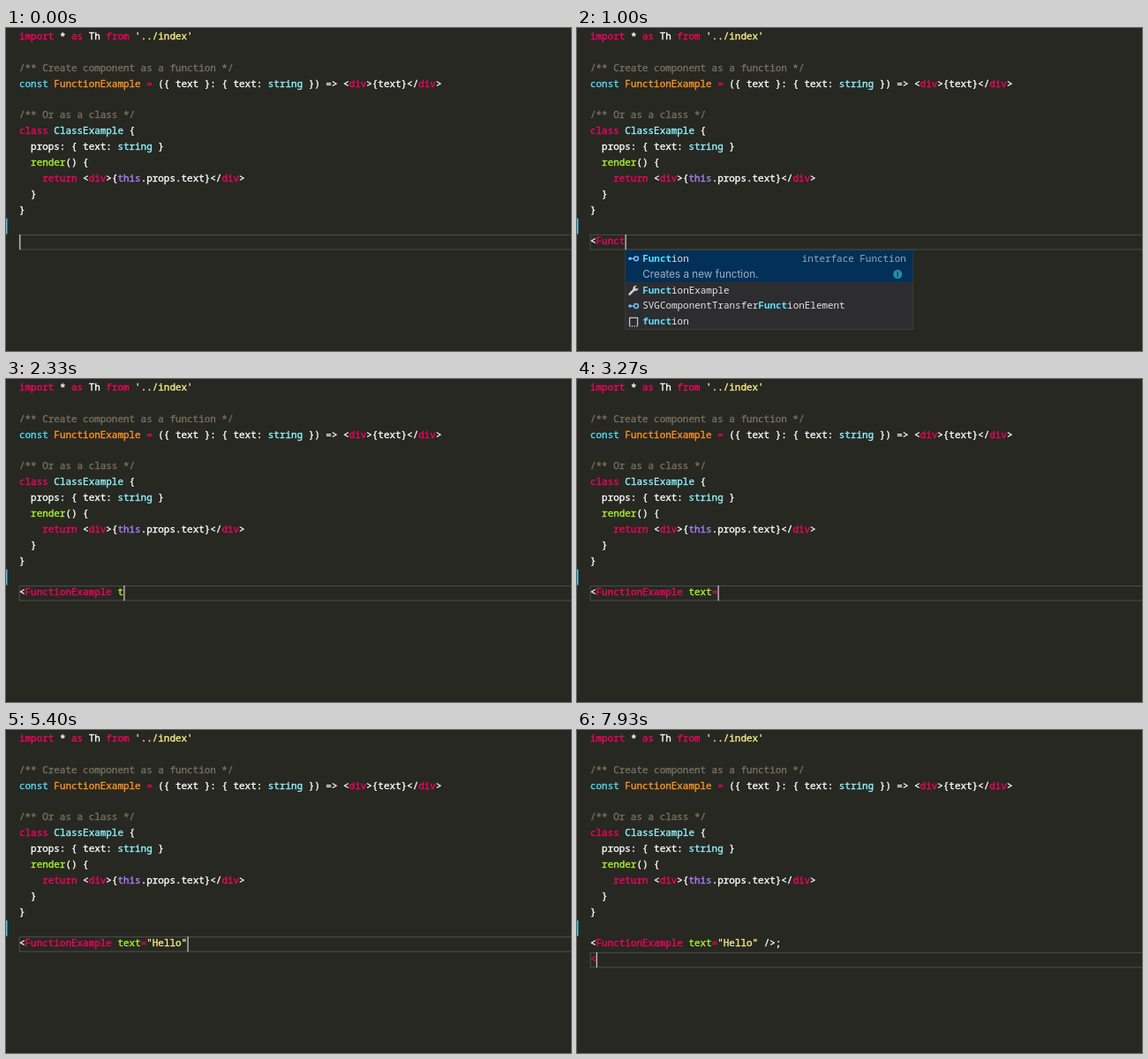
An HTML page that plays this animation: 640x366 px, repeating every 8000 ms.

```html
<!DOCTYPE html>
<html lang="en">
<head>
<meta charset="utf-8">
<title>Typing a component</title>
<style>
html, body { margin: 0; width: 100%; height: 100%; overflow: hidden; background: #272822; }
svg { display: block; width: 100vw; height: 100vh; }
text { font: 10.93px "Noto Sans Mono", "DejaVu Sans Mono", monospace; white-space: pre; }
.code tspan { fill: currentColor; stroke: currentColor; stroke-width: .35px; }
.doc { font: 11.7px Inter, "Open Sans", sans-serif; }
.hit { fill: #5fe0fb; font-weight: 700; }
</style>
</head>
<body>
<svg id="stage" viewBox="0 0 640 366"></svg>
<script>
const LOOP = 8000, LEFT = 15, CHAR = 6.56, LINE = 17.89, TOP = 1.4, ROW = 17.9;
const stage = document.getElementById('stage');
const colors = { w: '#ffffff', p: '#f60062', c: '#4fdcf5', t: '#92f5ff', o: '#ff9420', y: '#fdf08a',
                 g: '#adf52c', v: '#ae81ff', k: '#75715e' };

const esc = s => s.replace(/&/g, '&amp;').replace(/</g, '&lt;');
const rect = (x, y, w, h, fill, more = '') =>
  `<rect x="${x}" y="${y}" width="${w}" height="${h}" fill="${fill}" ${more}/>`;
const text = (x, y, body, fill, more = '') =>
  `<text x="${x}" y="${y}" fill="${fill}" ${more}>${body}</text>`;

// "~p" switches to colour p, and so on
const paint = s => s.split('~').slice(1)
  .map(part => `<tspan color="${colors[part[0]]}">${esc(part.slice(1))}</tspan>`).join('');
const codeLine = (n, s) => text(LEFT, TOP + 11.5 + n * LINE, paint(s), colors.w, 'class="code"');

const code = [
  "~pimport~w * ~pas~w Th ~pfrom~y '../index'",
  '',
  '~k/** Create component as a function */',
  '~cconst ~oFunctionExample ~p= ~w({ text }: { text: ~tstring~w }) => <~pdiv~w>{text}</~pdiv~w>',
  '',
  '~k/** Or as a class */',
  '~pclass ~tClassExample~w {',
  '~w  props: { text: ~tstring~w }',
  '~g  render~w() {',
  '~p    return ~w<~pdiv~w>{~vthis~w.props.text}</~pdiv~w>',
  '~w  }',
  '~w}'
].map((s, i) => codeLine(i, s)).join('');

// Suggestions: icon letter followed by the label
const svgParts = ['A', 'B', 'G', 'R'].map(c => `iSVGFEFunc${c}Element`);
const feParts = ['A', 'B', 'G', 'R'].map(c => `cfeFunc${c}`);
const transfer = 'iSVGComponentTransferFunctionElement';
const fn = { detail: 'interface Function', doc: 'Creates a new function.' };
const example = { detail: 'const FunctionExample: ({te…', doc: 'Create component as a function', sel: 0 };
const lists = {
  fu: { ...fn, sel: 3, scroll: true, items: [...feParts.slice(1), 'iFunction', 'wFunctionExample',
    transfer, 'iSVGFEDiffuseLightingElement', ...svgParts, 'kfunction'] },
  func: { ...fn, sel: 4, items: [...feParts, 'iFunction', 'wFunctionExample', transfer, ...svgParts, 'kfunction'] },
  funct: { ...fn, sel: 0, items: ['iFunction', 'wFunctionExample', transfer, 'kfunction'] },
  functione: { ...example, items: ['wFunctionExample', transfer] },
  functionex: { ...example, items: ['wFunctionExample'] },
  te: { sel: 0, detail: '(JSX attribute) text: string', doc: ' ', items: ['wtext'] },
  h: { sel: 0, items: ['kh', 'kheight', 'khref', 'khidden', 'kTh', 'kthis'] }
};

const icons = {
  c: '<path d="M-6 0L1-4 6-2V1L-1 5-6 3Z" fill="#75beff"/><path d="M-4 0L1-2.6 4-1.6-1 1Z" fill="#24465f"/>',
  i: '<path d="M-4 0H1" stroke="#75beff" stroke-width="1.3"/><circle cx="-4" r="1.8" fill="#75beff"/><circle cx="3" r="2.4" fill="none" stroke="#75beff" stroke-width="1.5"/>',
  w: '<path d="M-4.5 4.5L1-1" stroke="#d0d0d0" stroke-width="2.6" stroke-linecap="round"/><path d="M3.5-5A3 3 0 1 0 5.3-2.6L3-1.4 1.6-3Z" fill="#d0d0d0"/>',
  k: '<path d="M-4.5 4.5V-4.5H4.5V4.5" fill="none" stroke="#c5c5c5" stroke-width="1.3"/><path d="M-5 5H5" stroke="#c5c5c5" stroke-width="1.3" stroke-dasharray="1.5 1.2"/>'
};

function label(name, query) {
  let at = name.indexOf(query[0].toUpperCase() + query.slice(1));
  if (at < 0) at = name.toLowerCase().indexOf(query);
  if (at < 0) return esc(name);
  const end = at + query.length;
  return `${name.slice(0, at)}<tspan class="hit">${name.slice(at, end)}</tspan>${name.slice(end)}`;
}

function popup(x, query) {
  const key = Object.keys(lists).filter(k => query.startsWith(k)).pop();
  const { items, sel, detail, doc, scroll } = lists[key];
  const rows = items.length + (doc ? 1 : 0), h = rows * ROW;
  const top = rows > 6 ? 234.7 - h : 252;
  let out = rect(x, top, 326, h, '#2d2d30', 'stroke="#454545" stroke-width=".7"');
  out += rect(x + .4, top + sel * ROW, 325.2, ROW * (doc ? 2 : 1), '#023058');
  items.forEach((item, i) => {
    const y = top + (i + (doc && i > sel ? 1 : 0)) * ROW;
    out += `<g transform="translate(${x + 9.3} ${y + 9.3})">${icons[item[0]]}</g>`;
    out += text(x + 19.5, y + 12.7, label(item.slice(1), query), '#e4e4e4');
  });
  if (detail) {
    const y = top + sel * ROW;
    out += text(x + 318, y + 12.7, detail, '#98a7b5', 'text-anchor="end"');
    out += text(x + 19.5, y + ROW + 13.2, doc, '#a3b0bc', 'class="doc"');
    if (doc.trim()) out += `<circle cx="${x + 308.5}" cy="${y + ROW + 9.2}" r="5" fill="#248fa8"/>` +
      rect(x + 307.9, y + ROW + 6.2, 1.2, 6, '#023058');
  }
  if (scroll) out += rect(x + 319, top + 32, 6.5, h - 32, 'rgba(121,121,121,.35)');
  return out;
}

// [time, typed line, popup query, text after the cursor]
const keys = [[0, ''], [200, '<'], [330, '<F']];
[467, 800, 870, 1000, 1070, 1200, 1270, 1400, 1530].forEach((t, i) => {
  const word = 'Functionex'.slice(0, i + 2);
  keys.push([t, '<' + word, word.toLowerCase()]);
});
const tag = '<FunctionExample';
keys.push(
  [1870, tag], [2130, tag + ' '], [2270, tag + ' t'], [2400, tag + ' te', 'te'],
  [2800, tag + ' text'], [3070, tag + ' text='], [3600, tag + ' text="', '', '"'],
  [3870, tag + ' text="H', 'h', '"'], [4200, tag + ' text="He', '', '"'],
  [4530, tag + ' text="Hel', '', '"'], [4670, tag + ' text="Hell', '', '"'],
  [4800, tag + ' text="Hello', '', '"'], [5070, tag + ' text="Hello"'],
  [5900, tag + ' text="Hello"/'], [6100, tag + ' text="Hello"/>'],
  [7270, tag + ' text="Hello" />;'], [7400, tag + ' text="Hello" />;\n'],
  [7750, tag + ' text="Hello" />;\n<']
);

function highlight(s) {
  if (s === '<') return '~p<';
  const m = s.match(/^(<?)(\w*)(\s*\w*)(=?)("\w*"?)?(.*)$/);
  return 'wpgpyw'.split('').map((c, i) => '~' + c + (m[i + 1] || '')).join('');
}

function draw(now) {
  const t = now % LOOP;
  const [start, typed, query, after = ''] = keys.filter(k => k[0] <= t).pop();
  const lines = typed.split('\n'), last = lines.length - 1;
  const y = 234 + last * LINE, x = LEFT + lines[last].length * CHAR;
  let out = rect(0, 215.7, 1.5, 17.8, '#3fcbe2') + code;
  out += rect(15.2, y + .5, 640, 16.5, 'none', 'stroke="#484941" stroke-width="1.2"');
  lines.forEach((s, i) => out += codeLine(13 + i, highlight(s + (i === last ? after : ''))));
  if ((t - start) % 1000 < 500) out += rect(x + .2, y, 1.2, 17.2, '#d2d2ca');
  if (query) out += popup(x + .4, query);
  return out;
}

let shown = '';
function tick(now) {
  const next = draw(now);
  if (next !== shown) stage.innerHTML = shown = next;
  requestAnimationFrame(tick);
}
tick(performance.now());
</script>
</body>
</html>
```
